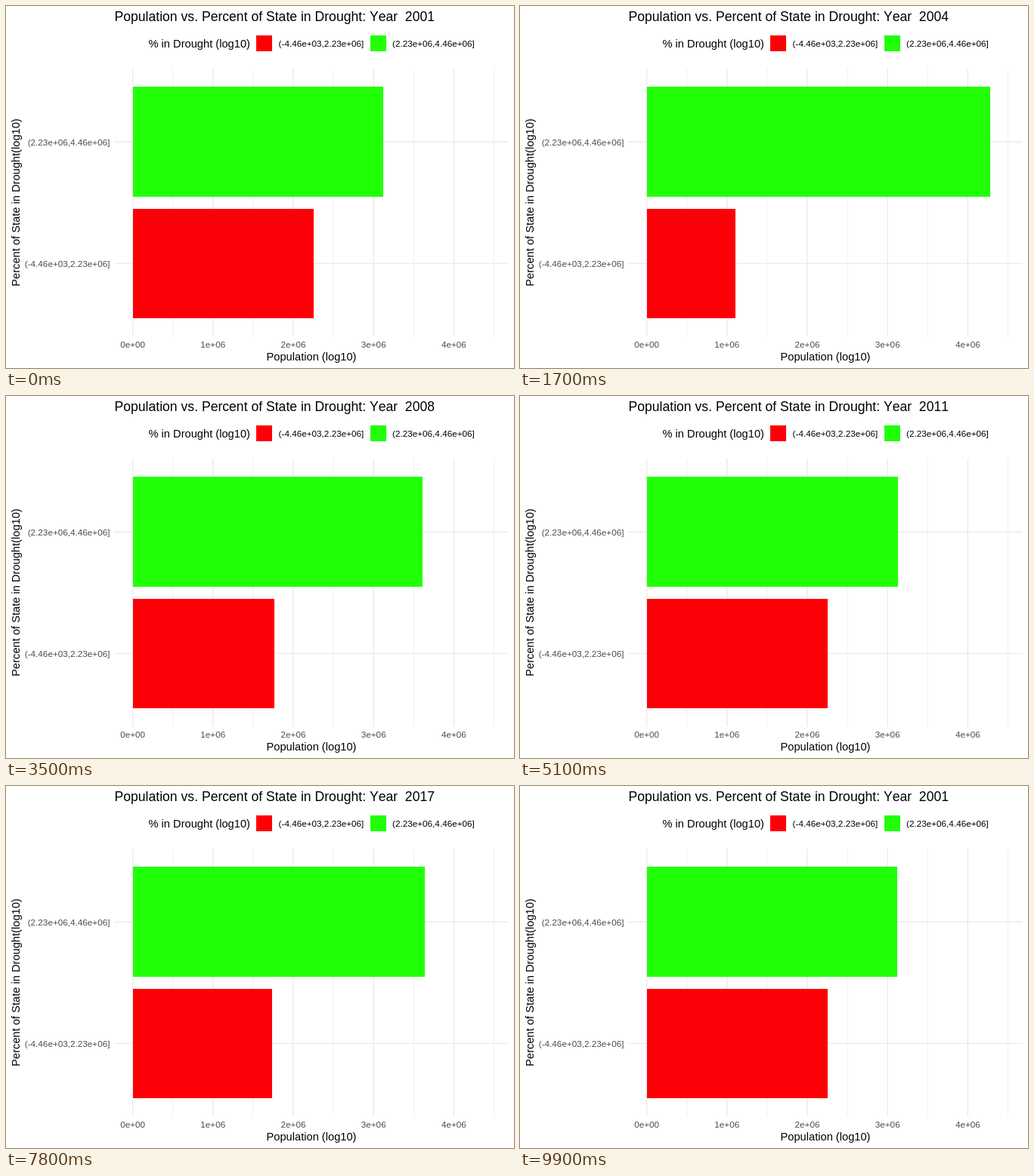
Recreate the animation shown at these times as an HTML page. Size 672 by 480 pixels, loop 10000 ms.

```html
<!DOCTYPE html>
<html lang="en">
<head>
<meta charset="utf-8">
<title>Population vs. Percent of State in Drought</title>
<style>
  html, body { margin: 0; width: 100%; height: 100%; overflow: hidden; background: #fff; }
  svg { display: block; width: 672px; height: 480px; }
  text { font-family: "Liberation Sans", Arial, sans-serif; font-kerning: none; white-space: pre; }
  .title { font-size: 17.6px; }
  .label { font-size: 14.667px; }
  .small { font-size: 11.733px; }
  .axis { fill: #4d4d4d; }
  .mid { text-anchor: middle; }
  .end { text-anchor: end; }
  #grid line { stroke: #ebebeb; }
</style>
</head>
<body>
<svg viewBox="0 0 672 480" xmlns="http://www.w3.org/2000/svg">
  <rect width="672" height="480" fill="#fff"/>
  <g id="grid"></g>
  <rect id="high" x="168" y="107" height="146" fill="#21ff06"/>
  <rect id="low" x="168" y="269" height="145" fill="#fd0007"/>

  <text id="title" class="title" x="143.5" y="20"></text>

  <text class="label" x="188.5" y="55">% in Drought (log10)</text>
  <rect x="331" y="39" width="21" height="21" fill="#fd0007"/>
  <text class="small" x="360.6" y="54">(-4.46e+03,2.23e+06]</text>
  <rect x="482" y="39" width="21" height="21" fill="#21ff06"/>
  <text class="small" x="511" y="54">(2.23e+06,4.46e+06]</text>

  <text class="small axis end" x="137.5" y="185">(2.23e+06,4.46e+06]</text>
  <text class="small axis end" x="137.5" y="346">(-4.46e+03,2.23e+06]</text>
  <g id="ticks"></g>
  <text class="label mid" x="404" y="470">Population (log10)</text>
  <text class="label mid" transform="translate(18 260.5) rotate(-90)">Percent of State in Drought(log10)</text>
</svg>
<script>
const NS = "http://www.w3.org/2000/svg";
const byId = id => document.getElementById(id);
const ZERO = 167.6, MILLION = 106.2;
const BAR_LEFT = 168, EDGE_SUM = 906.6;
const FRAME_MS = 100, FRAMES = 100;

// Right edge of the lower bar for each year from 2001; the two edges have a fixed sum.
const edges = [407.3, 425, 333, 265.3, 342.3, 394.2, 393.2, 355.3, 320, 316.3,
               400, 428, 386, 337, 367, 371, 346.2, 328.3, 279, 312];

function add(parent, tag, attrs, text) {
  const el = document.createElementNS(NS, tag);
  for (const name in attrs) el.setAttribute(name, attrs[name]);
  if (text) el.textContent = text;
  byId(parent).appendChild(el);
}

function gridLine(x1, y1, x2, y2, width) {
  add("grid", "line", { x1, y1, x2, y2, "stroke-width": width });
}

for (let i = 0; i < 5; i++) {
  const x = ZERO + i * MILLION;
  gridLine(x + MILLION / 2, 83, x + MILLION / 2, 438, 0.71);
  gridLine(x, 83, x, 438, 1.42);
  add("ticks", "text", { x, y: 453, class: "small axis mid" }, i + (i ? "e+06" : "e+00"));
}
for (const y of [180.2, 341.4]) gridLine(143.5, y, 664.5, y, 1.42);

// First frame of the move into year k.
const moveStart = k => k < 2 ? 1 : 5 * k - (k > 10 ? 4 : 3);

function draw(frame) {
  const count = edges.length;
  let k = 0;
  while (k < count && moveStart(k + 1) <= frame) k++;

  let from = 0, to = 0, p = 1;
  if (k > 0) {
    from = k - 1;
    to = k % count;
    p = Math.min(1, (frame - moveStart(k) + 1) / (k === 1 ? 5 : 4));
  }
  const edge = edges[from] + (edges[to] - edges[from]) * p;
  byId("low").setAttribute("width", Math.round(edge) - BAR_LEFT);
  byId("high").setAttribute("width", Math.round(EDGE_SUM - edge) - BAR_LEFT);
  byId("title").textContent =
    "Population vs. Percent of State in Drought: Year  " + (2001 + (p > 0.5 ? to : from));
}

const begin = performance.now();
let shown = -1;

function tick() {
  const frame = Math.floor((performance.now() - begin) / FRAME_MS) % FRAMES;
  if (frame !== shown) draw(shown = frame);
  requestAnimationFrame(tick);
}
tick();
</script>
</body>
</html>
```
